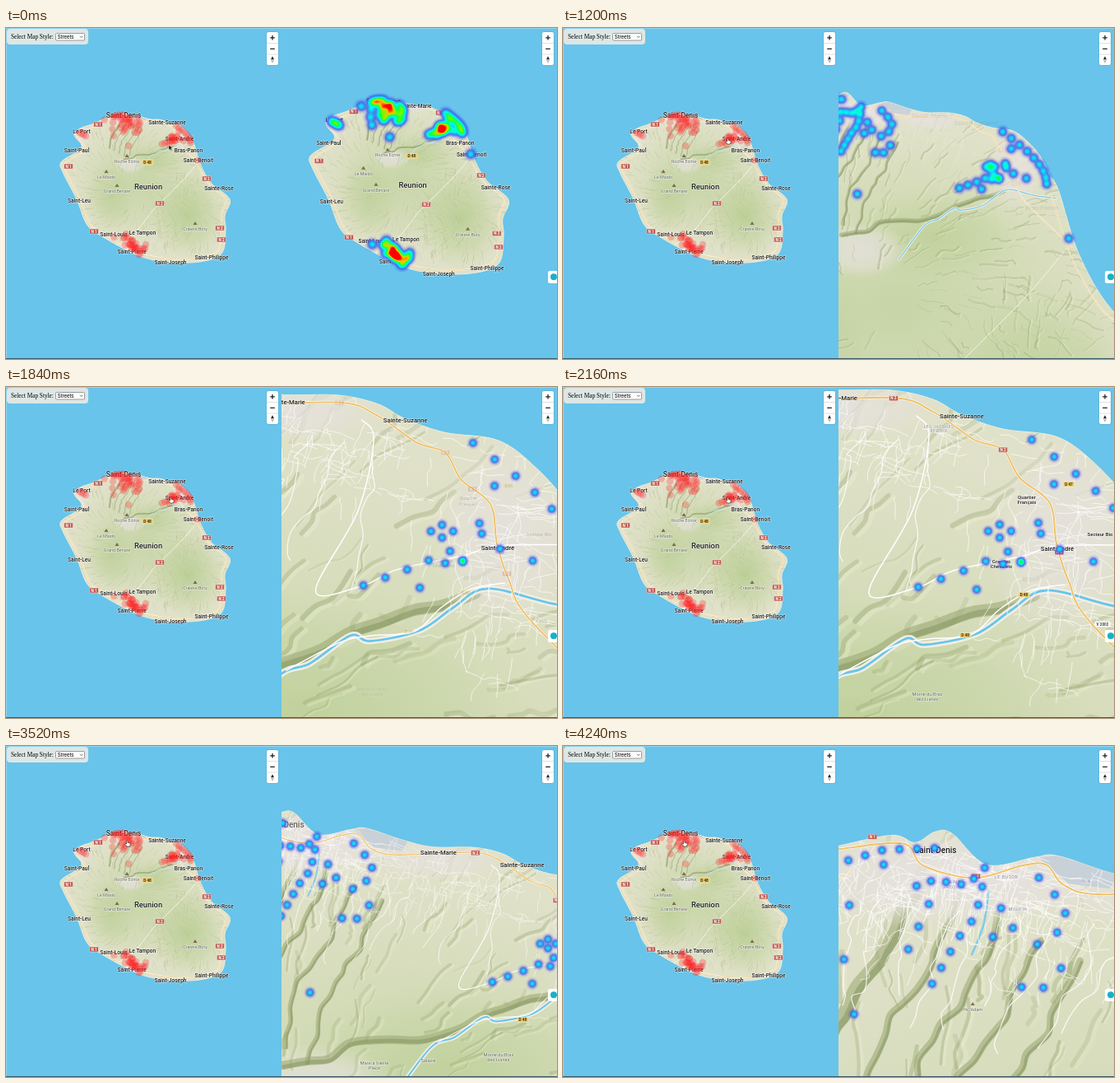
An HTML page for the animation above (4.32 s loop, 670 px wide and 402 px high).

```html
<!DOCTYPE html>
<html lang="en">
<head>
<meta charset="utf-8">
<title>Linked island maps</title>
<style>
  html, body { margin: 0; width: 670px; height: 402px; overflow: hidden; background: #68c4ea; }
  svg { display: block; }
  text { font-family: Roboto, "Open Sans", sans-serif; text-anchor: middle; }
  .label { fill: #1c1c1c; font-weight: 500; paint-order: stroke; stroke: #fff; stroke-width: 1; stroke-opacity: .75; stroke-linejoin: round; }
  .soft { fill: #5c6052; font-weight: 400; }
  .area { fill: #85829a; font-weight: 400; letter-spacing: .5px; }
  .line { fill: none; stroke-linecap: round; stroke-linejoin: round; }
  .fixed { vector-effect: non-scaling-stroke; }
</style>
</head>
<body>
<svg width="670" height="402" viewBox="0 0 670 402">
  <defs>
    <clipPath id="pane"><rect x="335" width="335" height="402"/></clipPath>
    <clipPath id="shore"><path id="shorePath"/></clipPath>
    <radialGradient id="forest"><stop stop-color="#b3cb8b" stop-opacity=".8"/><stop offset=".6" stop-color="#bfd19a" stop-opacity=".5"/><stop offset="1" stop-color="#ccd8aa" stop-opacity="0"/></radialGradient>
    <radialGradient id="urban"><stop stop-color="#e6e1e0"/><stop offset=".6" stop-color="#e5e1da" stop-opacity=".8"/><stop offset="1" stop-color="#e3e1d2" stop-opacity="0"/></radialGradient>
    <radialGradient id="kernel"></radialGradient>
    <filter id="heatRamp" filterUnits="userSpaceOnUse" x="335" y="0" width="335" height="402" color-interpolation-filters="sRGB">
      <feColorMatrix in="SourceGraphic" values="0 0 0 1 0  0 0 0 1 0  0 0 0 1 0  0 0 0 0 1"/>
      <feComponentTransfer result="ramp">
        <feFuncR type="table" tableValues=".15 .25 .1 0 0 .4 1 1 1 1 1"/>
        <feFuncG type="table" tableValues=".2 .38 .74 1 1 1 .75 0 0 0 0"/>
        <feFuncB type="table" tableValues="1 .9 .96 .95 .35 0 0 0 0 0 0"/>
      </feComponentTransfer>
      <feComponentTransfer in="SourceGraphic" result="mask">
        <feFuncA type="table" tableValues="0 .85 1 1 1 1 1 1 1 1 1"/>
      </feComponentTransfer>
      <feComposite in="ramp" in2="mask" operator="in"/>
    </filter>
    <g id="island"></g>
  </defs>
  <rect width="670" height="402" fill="#68c4ea"/>
  <g id="leftMap"><use href="#island" transform="translate(135.75 110.65) scale(.12469)"/></g>
  <g clip-path="url(#pane)">
    <g id="camera"><use href="#island"/><g id="streets" clip-path="url(#shore)"></g></g>
    <g id="rightLabels"></g>
    <g id="heat" filter="url(#heatRamp)"></g>
  </g>
  <g id="ui"></g>
  <g id="cursor"></g>
</svg>
<script>
const LOOP = 4320;
const $ = id => document.getElementById(id);
const clamp = v => Math.max(0, Math.min(1, v));
const lerp = (a, b, p) => a + (b - a) * p;
const mix = ([ax, ay], [bx, by], p) => [lerp(ax, bx, p), lerp(ay, by, p)];
const range = n => [...Array(n).keys()];

function add(parent, tag, attrs, text) {
  const el = document.createElementNS('http://www.w3.org/2000/svg', tag);
  for (const key in attrs) el.setAttribute(key, attrs[key]);
  if (text) el.textContent = text;
  parent.appendChild(el);
  return el;
}

let seed = 11;
const rnd = () => (seed = (seed * 16807) % 2147483647) / 2147483647;
const spread = size => (rnd() + rnd() + rnd() - 1.5) * size;

const pairs = (text, dx = 0, dy = 0) =>
  text.trim().split(/\s+/).map(p => p.split(',')).map(([x, y]) => [+x + dx, +y + dy]);
// World units are pixels at full zoom; the small map is 8.02 times smaller.
const toWorld = ([x, y]) => [8.02 * x - 1088.7, 8.02 * y - 887.4];
const toSmall = ([x, y]) => [x / 8.02 + 135.75, y / 8.02 + 110.65];

// Smooth curve through every point.
function curve(pts) {
  let d = `M${pts[0]}`;
  for (let i = 0; i < pts.length - 1; i++) {
    const a = pts[i - 1] || pts[i], b = pts[i], c = pts[i + 1], e = pts[i + 2] || c;
    d += `C${b[0] + (c[0] - a[0]) / 6},${b[1] + (c[1] - a[1]) / 6} ${c[0] - (e[0] - b[0]) / 6},${c[1] - (e[1] - b[1]) / 6} ${c}`;
  }
  return d;
}

// Points spaced evenly along a polyline, from one fraction of it to another.
function along(pts, count, from = 0, to = 1) {
  const lengths = pts.slice(1).map(([x, y], i) => Math.hypot(x - pts[i][0], y - pts[i][1]));
  const total = lengths.reduce((a, b) => a + b);
  return range(count).map(n => {
    let left = total * lerp(from, to, n / (count - 1)), i = 0;
    while (i < lengths.length - 1 && left > lengths[i]) left -= lengths[i++];
    return mix(pts[i], pts[i + 1], left / lengths[i]);
  });
}

// ---- Terrain ----
const northCoast = pairs(`-58,-42 7,-55 35,-46 59,-59 80,-57 122,-19 180,-28 208,-30 270,-10 325,3 400,4 450,15
  485,34 535,51 602,61 650,96 691,144 718,200`);
const southCoast = pairs(`229,142 237,167 250,189 272,208 266,228 267,246 262,274 235,284 195,284 160,276 115,252
  98,238 86,208 70,177 67,163 87,150 92,142 83,130 90,122 107,116`).map(toWorld);
const coast = [...northCoast, ...southCoast, northCoast[0]];
const shore = curve(coast) + 'Z';
$('shorePath').setAttribute('d', shore);

const island = $('island');
add(island, 'path', { d: shore, fill: '#e0e1c9', stroke: '#efeddb', 'stroke-width': 1, class: 'fixed' });
const land = add(island, 'g', { 'clip-path': 'url(#shore)' });
const blob = (fill, [x, y], rx, ry, opacity = 1) =>
  add(land, 'ellipse', { cx: x, cy: y, rx, ry, fill: `url(#${fill})`, opacity });
const line = (parent, pts, stroke, width, extra) =>
  add(parent, 'path', { d: curve(pts), class: 'line', stroke, 'stroke-width': width, ...extra });

blob('forest', toWorld([165, 188]), 720, 600, .7);
blob('forest', toWorld([222, 228]), 380, 420);
blob('forest', toWorld([128, 205]), 260, 360, .7);
blob('forest', toWorld([180, 160]), 300, 160, .7);
blob('urban', [120, 440], 150, 90, .8);

// Relief: each gully is a dark stroke with a lit slope beside it, leaning away from the peaks.
for (const i of range(620)) {
  const east = i % 4 === 0, [px, py] = toWorld(east ? [225, 225] : [158, 188]);
  const angle = rnd() * 6.283, reach = 60 + Math.sqrt(rnd()) * (east ? 300 : 600);
  let x = px + Math.cos(angle) * reach, y = py + Math.sin(angle) * reach;
  const step = 8 + rnd() * 16, width = 2 + rnd() * 5, opacity = .14 + rnd() * .22;
  const pts = range(5).map(() => {
    x += Math.cos(angle + .4) * step + spread(9);
    y += Math.sin(angle + .4) * step + spread(9);
    return [x, y];
  });
  line(land, pts.map(([a, b]) => [a + width, b + width * .4]), '#f0f0d6', width, { opacity });
  line(land, pts, '#8a9962', width, { opacity });
}

// Parallel valleys above the capital, and one long scarp.
function valley(pts, width) {
  const wavy = along(pts, 14).map(([x, y]) => [x + spread(7), y + spread(5)]);
  line(land, wavy, '#9aa772', width, { opacity: .55 });
  line(land, wavy.map(([x, y]) => [x + width / 4, y + 2]), '#84935e', width / 2, { opacity: .5 });
}
for (const i of range(5)) {
  const x = 42 + i * 48, y = -8 + i * 26;
  valley([[x, y], [x - 38, y + 85], [x - 105, y + 185], [x - 125, y + 290]], i ? 8 : 17);
}
valley(pairs('60,390 150,375 190,342 335,345 400,305 530,265 575,250'), 15);

blob('urban', [85, -5], 260, 65);
blob('urban', [610, 180], 95, 130, .8);
blob('urban', [340, 25], 120, 40, .8);
blob('urban', toWorld([92, 130]), 110, 120, .8);
blob('urban', toWorld([152, 268]), 220, 90, .8);
add(land, 'path', { d: 'M185,-28L208,-30 282,-8 272,10 222,4Z', fill: '#c9d1d8' });

const river = pairs('740,275 670,266 588,247 545,271 502,300 440,313 416,306 365,341 320,362 240,470');
line(land, river, '#efeee4', 8);
line(land, river, '#68c4ea', 2.8);
line(land, pairs('124,15 118,55 104,90'), '#7fcbea', 2.5);

const highway = pairs(`-58,-38 20,-45 45,-18 107,-3 165,-18 195,-19 215,5 260,17 400,13 450,30 500,64 535,76
  555,110 592,141 600,190 615,236 645,290 790,430`);
const ringRoad = coast.map(p => mix(p, [275, 677], .045)).slice(northCoast.length);
const crossRoad = pairs('135,264 160,245 178,222 187,213 215,185 232,165').map(toWorld);
line(land, crossRoad, '#f8f6ec', .9, { class: 'line fixed' });
for (const road of [highway, ringRoad]) {
  line(land, road, '#fff', 1.6, { class: 'line fixed' });
  line(land, road, '#efc36f', .8, { class: 'line fixed' });
}

// ---- Streets seen only when zoomed in ----
const streets = $('streets');
function wander(x, y, angle, step, count, wobble, width) {
  const pts = range(count).map(() => [x += Math.cos(angle) * step + spread(wobble), y += Math.sin(angle) * step + spread(wobble)]);
  line(streets, pts, '#fff', width, { opacity: .85 });
}
function town(cx, cy, rx, ry, count, tilt) {
  for (const i of range(count))
    wander(cx + spread(rx), cy + spread(ry), tilt + (i % 2) * 1.57, 9, 5, 6, .8);
}
town(80, 0, 150, 55, 170, .2);
town(190, 35, 110, 90, 80, .4);
town(-10, 20, 70, 70, 35, .9);
town(600, 170, 80, 150, 120, .15);
town(400, 60, 180, 70, 90, .3);
for (const i of range(13)) wander(-30 + i * 40, 10 + i * 4, 1.95, 17, 9, 13, 1.2);
const villageRoad = pairs('430,35 445,60 425,150 372,250 432,243 475,223 560,205 600,193 690,192');
const valleyRoad = pairs('335,350 404,314 445,306 496,301 531,270 569,247 610,240');
for (const road of [villageRoad, valleyRoad]) line(streets, road, '#fff', 1.5);
line(streets, highway, '#fff', 3);
line(streets, highway, '#efbf62', 1.9);

// ---- Data points ----
const eastPoints = [
  ...range(9).map(i => [570 + 140 * Math.sin(i / 8 * Math.PI / 2), 64 + i / 8 * 166]),
  ...range(4).map(i => [531 + 14 * Math.cos(i * Math.PI / 2), 175 + 8 * Math.sin(i * Math.PI / 2)]),
  ...along(pairs('432,243 485,224 541,200'), 5),
  ...pairs('557,212 557,213 535,215 503,246 578,165 581,178 604,197 645,212 597,118')
];
const chain = (text, count) => along(pairs(text, -393.4, -163.3), count);
const capitalPoints = [
  ...chain('347,139 390,126 452,124', 6), ...chain('430,170 451,163 492,169 513,148', 6),
  ...chain('510,171 502,207 481,233 449,289', 7), ...chain('579,160 612,195 609,222 577,241', 5),
  ...chain('606,270 577,302 558,293', 3), ...chain('523,232 548,222 533,197', 3),
  ...chain('445,192 420,247', 3), ...chain('390,144 354,172 337,234 354,326', 4),
  ...chain('265,170 501,425', 2)
];
const westPoints = along(pairs('-374,130 -310,165'), 4);
const southPoints = range(30).map(() => {
  const t = spread(.8);
  return [140 + t * 130 + spread(50), 1222 + t * 90 + spread(45)];
});
const points = [...eastPoints, ...capitalPoints, ...westPoints, ...southPoints, [780, 403], [274, 1222]];

for (const i of range(9)) {
  const r = i / 8;
  add($('kernel'), 'stop', { offset: r, 'stop-color': '#000', 'stop-opacity': i < 8 ? .27 * Math.exp(-4.9 * r * r) : 0 });
}
const dots = points.map(() => add($('heat'), 'circle', { fill: 'url(#kernel)' }));

// ---- Labels ----
const SHIELDS = { N: ['#c1584f', '#fff'], D: ['#e9c560', '#443a18'], V: ['#fff', '#444'] };
function makeLabel(parent, text, size, kind = '') {
  const g = add(parent, 'g', {});
  if (!size) {
    const [fill, ink] = SHIELDS[text[0]], w = text.length * 2.6 + 3;
    add(g, 'rect', { x: -w / 2, y: -3, width: w, height: 6, rx: .8, fill, stroke: '#fff', 'stroke-width': .4 });
    add(g, 'text', { y: 1.7, 'font-size': 4.7, 'font-weight': 700, fill: ink }, text);
    return g;
  }
  const rows = text.split('|');
  rows.forEach((row, i) => add(g, 'text', {
    class: 'label ' + kind, 'font-size': size, y: size * (.36 + (i - (rows.length - 1) / 2) * 1.05)
  }, row));
  if (kind === 'soft peak') add(g, 'path', { d: 'M-2.5,-5L0,-9 2.5,-5Z', fill: '#7b6a50' });
  return g;
}
// "Name@x,y; Name@x,y" with one style for all of them.
const places = (text, size, kind) => text.split(';').map(item => {
  const [name, at] = item.trim().split('@');
  return { name, at: pairs(at)[0], size, kind };
});
const shields = (name, spots) => spots.map(at => ({ name, at }));

const overview = [
  ...places('Saint-Denis@143,106', 8.3), ...places('Reunion@173,193', 9.4),
  ...places(`Le Port@92,126; Saint-Paul@86,149; Saint-Leu@89,210; Saint-Louis@131,251; Le Tampon@166,249; Saint-Pierre@153,272;
    Saint-Joseph@200,285; Saint-Philippe@250,279; Sainte-Rose@259,195; Saint-Benoit@234,161; Bras-Panon@222,149; Saint-André@211,135`, 6.6),
  ...places('Roche Ecrite@147,162; Le Maïdo@122,181; Grand Bénare@135,198; Cratère Bory@230,244', 5.4, 'soft peak'),
  ...places('N 1@112,117; N 1@76,168; N 1@107,247; N 2@187,213; N 2@244,183; N 2@260,243; N 2@262,257; D 48@172,163')
];
const END = 9999, START = -999;
const groups = [
  [START, 1130, [...overview, ...places('Sainte-Marie@176.5,111.5', 6.6), ...places('N 2@201.4,118.3')]
    .map(p => ({ ...p, at: toWorld(p.at) }))],
  [1180, END, places('Sainte-Marie@336,13; Sainte-Suzanne@485,35; Saint-André@601,196; Bras-Panon@695,306', 7.7)],
  [1180, 1900, shields('N 2', along(highway, 2, .64, .75))],
  [1800, 2420, [...shields('N 2', along(highway, 4, .45, .86)), ...shields('D 48', along(valleyRoad, 2, .54, .83)),
    ...places('LES JACQUES|BEL AIR@457,51', 5, 'area'), ...places('Quartier|Français@564,137', 6), ...places('D 47@615,118')]],
  [1800, 3350, [...places('Grandes|Chevalets@533,215; Secteur Bio@653,179', 6), ...places('V 2002@656,288')]],
  [1800, END, places('Morne du Bras|des Lianes@443,376; Salazie@318,382', 5.7, 'soft')],
  [2300, 3300, [...shields('N 2', along(highway, 6, .42, .82)), ...shields('D 48', along(valleyRoad, 4, .25, .86)),
    ...places('D 47@641,122'), ...places('LE GRAND|HAZIER@438,40; RÉSIDENCE|DES|LONGANIS@615,177', 5, 'area'),
    ...places('La Ressource|Berau@389,75; La Grande|Montée@427,97; Délices@551,126; Deux Rives|Montrepos@531,176', 6.2)]],
  [3220, 3850, [...shields('N 2', along(highway, 2, .45, .61)), ...shields('D 48', [[486, 310]]),
    ...places('Mare à Vieille|Place@222,391', 5.8, 'soft')]],
  [3380, END, places('Saint-Denis@59.6,-37', 10)],
  [3650, END, [...places('N 1@-17,-53; N 6@109,-5'), ...places('Pic Adam@105,157', 5.6, 'soft peak'),
    ...places('LE BUTOR@146,-4; MOUFIA@160,35; SAINT-|JACQUES@82,5; RLN@243,1', 5.4, 'area')]]
];
const labels = groups.flatMap(([from, to, items]) => items.map(({ name, at, size, kind }) =>
  ({ from, to, at, el: makeLabel($('rightLabels'), name, size, kind) })));

for (const { name, at, size, kind } of [...overview, ...places('Sainte-Suzanne@196,115', 6.5)])
  makeLabel($('leftMap'), name, size, kind).setAttribute('transform', `translate(${at})`);
for (const p of points) {
  const [cx, cy] = toSmall(p);
  add($('leftMap'), 'circle', { cx, cy, r: 4.2, fill: '#f22', opacity: .27 });
}

// ---- Controls ----
const ui = $('ui');
add(ui, 'rect', { x: 1, y: 1, width: 99, height: 19, rx: 4, fill: '#dde7e5' });
add(ui, 'text', { x: 6, y: 13, 'font-size': 7.3, style: 'font-family:"Liberation Serif",serif;text-anchor:start' }, 'Select Map Style:');
add(ui, 'rect', { x: 60.5, y: 6.5, width: 35, height: 8.5, rx: 1, fill: '#fff', stroke: '#777', 'stroke-width': .7 });
add(ui, 'text', { x: 62.5, y: 13, 'font-size': 6.3, style: 'font-family:"Liberation Sans",sans-serif;text-anchor:start' }, 'Streets');
add(ui, 'path', { d: 'M90,9.8l1.7,1.8 1.7,-1.8', fill: 'none', stroke: '#333', 'stroke-width': .7 });
for (const x of [317, 652]) {
  const g = add(ui, 'g', { transform: `translate(${x} 5)` });
  add(g, 'rect', { x: -.5, y: -.5, width: 15, height: 41, rx: 2.5, fill: '#4a90ad', opacity: .5 });
  add(g, 'rect', { width: 14, height: 40, rx: 2, fill: '#fff' });
  add(g, 'path', { d: 'M0,13.5h14M0,27h14', stroke: '#ccc', 'stroke-width': .6 });
  add(g, 'path', { d: 'M4.2,6.8h5.6M7,4v5.6M4.2,20.3h5.6', stroke: '#222', 'stroke-width': 1.3 });
  add(g, 'path', { d: 'M5,33.2L7,29.3 9,33.2Z', fill: '#222' });
  add(g, 'path', { d: 'M5,34L7,38 9,34Z', fill: '#bbb' });
}
add(ui, 'rect', { x: 659, y: 295, width: 14, height: 15, rx: 2.5, fill: '#fff' });
add(ui, 'circle', { cx: 666, cy: 302.3, r: 4, fill: '#16b1c9' });
add(ui, 'path', { d: 'M0,.5H670M.5,0V402', stroke: '#a5d8ee', 'stroke-width': 1, opacity: .7 });
add(ui, 'path', { d: 'M0,401.5H670', stroke: '#38586a', 'stroke-width': 1 });

const arrow = add($('cursor'), 'path', { d: 'M0,0V6.2L1.5,5 2.6,7.3 3.6,6.8 2.6,4.6H4.5Z', fill: '#111', stroke: '#fff', 'stroke-width': .4 });
const hand = add($('cursor'), 'path', {
  d: 'M-1.2,4L-3.2,1.2Q-3.4,0 -2,.5L-1.4,1V-2.5Q-.7,-3.6 0,-2.5V-.5Q.8,-1.2 1.3,-.3Q2.2,-.8 2.5,.3Q3.4,.2 3.3,1.2L2.4,4Z',
  fill: '#fff', stroke: '#222', 'stroke-width': .6
});

// ---- Camera ----
const VIEWS = [{ x: 353, y: 730, k: .1465 }, { x: 502.5, y: 201, k: 1 }, { x: 109.1, y: 37.7, k: 1 }];

// Zoom-and-pan flight along the optimal path between two views.
function flight(a, b, start) {
  const rho = 1.42, rho2 = rho * rho, w0 = 402, w1 = w0 * a.k / b.k;
  const u1 = Math.hypot(b.x - a.x, b.y - a.y) * a.k;
  const bend = (w, sign) => -Math.asinh((w1 * w1 - w0 * w0 + sign * rho2 * rho2 * u1 * u1) / (2 * w * rho2 * u1));
  const r0 = bend(w0, 1), r1 = bend(w1, -1);
  return {
    start, duration: (r1 - r0) / rho / 1.2 * 1000,
    at(p) {
      const r = lerp(r0, r1, p);
      const u = w0 * (Math.cosh(r0) * Math.tanh(r) - Math.sinh(r0)) / rho2 / u1;
      return { x: lerp(a.x, b.x, u), y: lerp(a.y, b.y, u), k: a.k * Math.cosh(r) / Math.cosh(r0) };
    }
  };
}
const flights = [flight(VIEWS[0], VIEWS[1], 826), flight(VIEWS[1], VIEWS[2], 3197)];

// cubic-bezier(.25, .1, .25, 1)
function ease(x) {
  if (x <= 0 || x >= 1) return clamp(x);
  let lo = 0, hi = 1;
  for (let i = 0; i < 24; i++) {
    const s = (lo + hi) / 2, q = 1 - s;
    if (.75 * s * q + s * s * s < x) lo = s; else hi = s;
  }
  return .3 * lo * (1 - lo) ** 2 + 3 * lo * lo * (1 - lo) + lo ** 3;
}

const STOPS = [[198, 142], [201, 137], [148, 118]];
const cursorAt = t => t < 2250
  ? mix(STOPS[0], STOPS[1], ease((t - 80) / 400))
  : mix(STOPS[1], STOPS[2], ease((t - 2250) / 550));

function draw(t) {
  const f = flights[t < flights[1].start ? 0 : 1];
  const { x, y, k } = f.at(ease((t - f.start) / f.duration));
  const project = ([px, py]) => [502.5 + (px - x) * k, 201 + (py - y) * k];
  $('camera').setAttribute('transform', `translate(${project([0, 0])}) scale(${k})`);
  streets.setAttribute('opacity', clamp((k - .25) / .35));
  points.forEach((p, i) => {
    const [cx, cy] = project(p);
    dots[i].setAttribute('cx', cx);
    dots[i].setAttribute('cy', cy);
    dots[i].setAttribute('r', lerp(11, 8.6, clamp(k * 1.5)));
  });
  for (const { from, to, at, el } of labels) {
    const alpha = clamp((t - from) / 220) * clamp((to - t) / 220);
    el.setAttribute('visibility', alpha ? 'visible' : 'hidden');
    el.setAttribute('opacity', alpha);
    el.setAttribute('transform', `translate(${project(at)})`);
  }
  $('cursor').setAttribute('transform', `translate(${cursorAt(t)})`);
  arrow.setAttribute('visibility', t < 420 ? 'visible' : 'hidden');
  hand.setAttribute('visibility', t < 420 ? 'hidden' : 'visible');
}

const begin = performance.now();
function tick() {
  draw((performance.now() - begin) % LOOP);
  requestAnimationFrame(tick);
}
tick();
</script>
</body>
</html>
```
